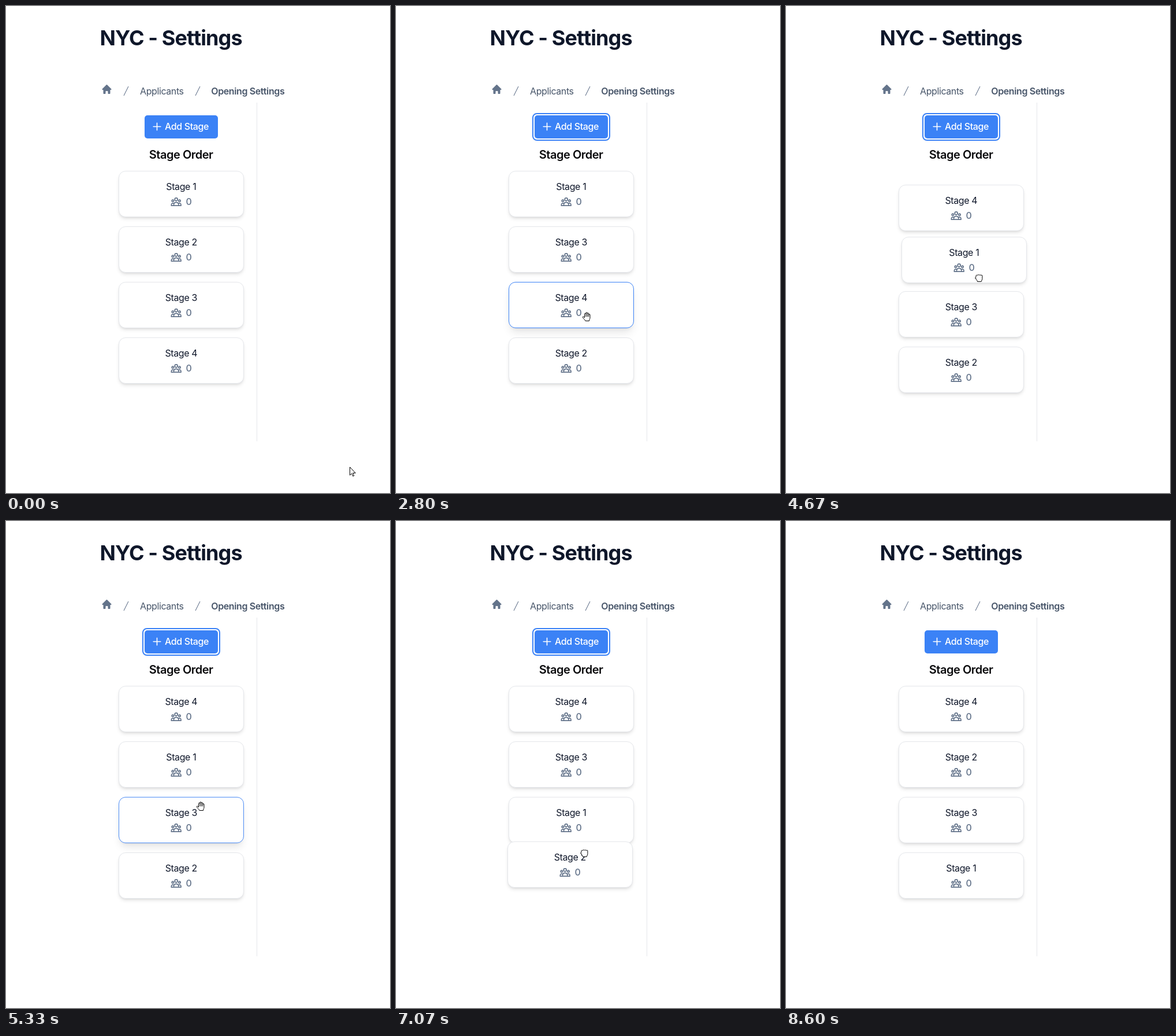
These frames come from a looping animation (665 by 842 pixels, 8.67 s). An HTML page:

```html
<!DOCTYPE html>
<html lang="en">
<head>
<meta charset="utf-8">
<title>Stage order</title>
<style>
  html, body { margin: 0; width: 100%; height: 100%; overflow: hidden; background: #fff; }
  svg { position: absolute; left: 0; top: 0; overflow: visible; }
  text { font-family: Inter, "Liberation Sans", sans-serif; font-size: 16px; letter-spacing: -0.025em; }
  .mid { text-anchor: middle; }
  .card {
    position: absolute; left: 0; top: 0; width: 217px; height: 80px; box-sizing: border-box;
    background: #fff; border: 1px solid; border-radius: 12px;
  }
  .card svg { left: -1px; top: -1px; }
  #pointer { z-index: 9; }
</style>
</head>
<body>
<svg width="665" height="842">
  <text x="162.5" y="68" font-weight="700" fill="#0f172a" style="font-size:36px">NYC - Settings</text>
  <g fill="#64748b">
    <path transform="translate(164.5 134)" d="M9.293 2.293a1 1 0 011.414 0l7 7A1 1 0 0117 11h-1v6a1 1 0 01-1 1h-2a1 1 0 01-1-1v-3a1 1 0 00-1-1H9a1 1 0 00-1 1v3a1 1 0 01-1 1H5a1 1 0 01-1-1v-6H3a1 1 0 01-.707-1.707l7-7z"/>
    <path id="slash" transform="translate(198 137)" d="M5.555 17.776l8-16 .894.448-8 16-.894-.448z"/>
    <use href="#slash" x="124"/>
  </g>
  <text x="232" y="152.5" fill="#475569">Applicants</text>
  <text x="355.3" y="152.5" font-weight="600" fill="#475569">Opening Settings</text>
  <path d="M434.5 167V752.5" stroke="#e5e7eb"/>
  <rect id="ring" x="237" y="186" width="133" height="46" rx="7" fill="none" stroke="#3b82f6" stroke-width="2"/>
  <rect x="240" y="189" width="127" height="40" rx="5" fill="#3b82f6"/>
  <path d="M255.2 208.5h12.6M261.5 202.2v12.6" stroke="#fff" stroke-width="1.6" stroke-linecap="round"/>
  <text class="mid" x="313" y="214" font-weight="500" fill="#fff">Add Stage</text>
  <text class="mid" x="303.2" y="264" font-weight="600" fill="#09090b" style="font-size:20px">Stage Order</text>
</svg>
<div id="list"></div>
<svg id="pointer" width="665" height="842">
  <g id="cursor" fill="#fff" stroke="#000" stroke-linejoin="round" stroke-linecap="round">
    <path id="arrow" d="M.5.5V14.2L3.7 11.3 5.8 16 7.8 15.1 5.7 10.5H9.8Z"/>
    <path id="point" d="M-1.5 11V1.3a1.4 1.4 0 0 1 2.8 0V7.2a1.4 1.4 0 0 1 2.7.2 1.3 1.3 0 0 1 2.5.6 1.2 1.2 0 0 1 2.3.6V13c0 2-1.2 3-1.5 5.5H.3C-.5 15.5-3 13-4.6 10.6c-.8-1.4.8-2.4 1.9-1.2zM1.3 7.2v3M4 7.4v2.6M6.5 8v2"/>
    <path id="grab" d="M-3.5 1.5V-4.5a1.2 1.2 0 0 1 2.4 0V-6a1.2 1.2 0 0 1 2.4 0v1a1.2 1.2 0 0 1 2.4 0v2a1.1 1.1 0 0 1 2.3 0V2c0 2-1.3 3-1.5 5.5h-6.5C-3 5-5 4-6.6 1.6c-.8-1.4.9-2.2 2-1.1zM-1.1-4.5V0M1.3-5V0M3.7-3V0"/>
    <path id="fist" d="M-5.2 1.5c-1.6-.3-1.6-2.4.2-2.6V-3.5a1.5 1.5 0 0 1 2.6-.8 1.6 1.6 0 0 1 2.9-.3 1.6 1.6 0 0 1 2.8.5 1.4 1.4 0 0 1 2.6 1V1.5c0 2.3-1.5 2.8-1.7 5H-2.5c-.2-2.5-2.2-3-2.7-5z"/>
  </g>
</svg>
<script>
const LOOP = 8670, TICK = 1000 / 15, DROP_TIME = 330, FADE = 150;
const LEFT = 195, TOP = 285, STEP = 96, PUSH = 112, W = 217, H = 80;
const $ = id => document.getElementById(id);
const clamp = v => Math.min(1, Math.max(0, v));
const lerp = (a, b, u) => a + (b - a) * u;

// Pointer way points: time, x, y
const path = [
  [10, 595, 797], [450, 328, 435], [1060, 328, 435], [1333, 320, 517], [1440, 322, 624],
  [2230, 322, 624], [2640, 330, 537], [3110, 330, 537], [3500, 327, 444], [3800, 327, 444],
  [4180, 329, 356], [4330, 329, 356], [4667, 334, 470], [4760, 334, 473], [5130, 334, 473],
  [5480, 339, 505], [5640, 339, 505], [6000, 335, 421], [6110, 335, 410], [6250, 335, 410],
  [6780, 328, 593], [6880, 328, 593], [7067, 326, 574], [7250, 336, 470], [7400, 333, 405],
  [7700, 333, 405], [8000, 173, 711], [8133, 97, 835], [8200, 60, 900]
];

// shifts: the times at which neighbours make room
const drags = [
  { id: 2, to: 3, grab: 1062, drop: 1440, shifts: [1285, 1390] },
  { id: 4, to: 1, grab: 3120, drop: 3530, shifts: [3380] },
  { id: 1, to: 1, grab: 4330, drop: 4860, shifts: [4591] },
  { id: 3, to: 1, grab: 5650, drop: 6200, shifts: [5945] },
  { id: 2, to: 1, grab: 6885, drop: 7420, shifts: [7130, 7290] }
];

function bezier(x1, y1, x2, y2) {
  const f = (a, b, s) => 3 * a * s * (1 - s) ** 2 + 3 * b * s * s * (1 - s) + s ** 3;
  return x => {
    let lo = 0, hi = 1;
    for (let i = 0; i < 24; i++) {
      const m = (lo + hi) / 2;
      if (f(x1, x2, m) < x) lo = m; else hi = m;
    }
    return f(y1, y2, lo);
  };
}
const moveEase = bezier(.2, 0, 0, 1), dropEase = bezier(.2, 1, .1, 1);
const moved = (t, start) => t < start ? 0 : t >= start + 200 ? 1 : moveEase((t - start) / 200);

// Monotone cubic through the way points
function slope(i, k) {
  if (i < 1 || i >= path.length - 1) return 0;
  const [a, b, c] = [path[i - 1], path[i], path[i + 1]];
  const p = (b[k] - a[k]) / (b[0] - a[0]), q = (c[k] - b[k]) / (c[0] - b[0]);
  return p * q > 0 ? 2 * p * q / (p + q) : 0;
}
function cursorAt(t) {
  const last = path.length - 1;
  if (t <= path[0][0]) return path[0].slice(1);
  if (t >= path[last][0]) return path[last].slice(1);
  const i = path.findIndex(p => p[0] > t) - 1, a = path[i], b = path[i + 1];
  const d = b[0] - a[0], u = (t - a[0]) / d, v = 1 - u;
  return [1, 2].map(k =>
    a[k] * (1 + 2 * u) * v * v + b[k] * u * u * (3 - 2 * u) +
    d * u * v * (v * slope(i, k) - u * slope(i + 1, k)));
}

// Card places by id, and the drag under way
function layout(t) {
  let order = [1, 2, 3, 4], drag = null;
  const place = {};
  for (const d of drags) {
    if (t < d.grab) break;
    if (t < d.drop + DROP_TIME) { drag = d; break; }
    order = order.filter(id => id !== d.id);
    order.splice(d.to, 0, d.id);
  }
  if (!drag) {
    order.forEach((id, i) => place[id] = [LEFT, TOP + STEP * i]);
    return { place, drag };
  }
  const home = order.indexOf(drag.id), down = drag.to > home;
  order.filter(id => id !== drag.id).forEach((id, j) => {
    const k = down ? j - home : home - 1 - j;
    const m = k >= 0 && k < drag.shifts.length ? moved(t, drag.shifts[k]) : 0;
    const push = j >= home ? 1 - m : m;
    place[id] = [LEFT, TOP + STEP * j + PUSH * push];
  });
  const from = cursorAt(drag.grab), now = cursorAt(Math.min(t, drag.drop));
  const x = LEFT + now[0] - from[0], y = TOP + STEP * home + now[1] - from[1];
  const u = t > drag.drop ? dropEase((t - drag.drop) / DROP_TIME) : 0;
  place[drag.id] = [lerp(x, LEFT, u), lerp(y, TOP + STEP * drag.to, u)];
  return { place, drag };
}

const inside = ([x, y], [l, t]) => x >= l && x < l + W && y >= t && y < t + H;
function hovered(t) {
  const { place, drag } = layout(t), c = cursorAt(t);
  return drag ? 0 : [1, 2, 3, 4].find(id => inside(c, place[id])) || 0;
}

function cursorKind(t, drag) {
  if (!drag) return hovered(t) ? "grab" : "arrow";
  if (t >= drag.drop) return "grab";
  const { place } = layout(t - 30), c = cursorAt(t);
  return [1, 2, 3, 4].some(id => id !== drag.id && inside(c, place[id])) ? "point" : "fist";
}

const people = "M17 20h5v-2a3 3 0 00-5.356-1.857M17 20H7m10 0v-2c0-.656-.126-1.283-.356-1.857M7 20H2v-2a3 3 0 015.356-1.857M7 20v-2c0-.656.126-1.283.356-1.857m0 0a5.002 5.002 0 019.288 0M15 7a3 3 0 11-6 0 3 3 0 016 0zm6 3a2 2 0 11-4 0 2 2 0 014 0zM7 10a2 2 0 11-4 0 2 2 0 014 0z";
const cards = [1, 2, 3, 4].map(id => {
  const el = document.createElement("div");
  el.className = "card";
  el.innerHTML = `<svg width="${W}" height="${H}">
    <text class="mid" x="108.3" y="33" fill="#0f172a">Stage ${id}</text>
    <path transform="translate(89.7 43.5) scale(.833)" d="${people}" fill="none" stroke="#64748b"
      stroke-width="2" stroke-linecap="round" stroke-linejoin="round"/>
    <text class="mid" x="121.5" y="59" font-weight="500" fill="#64748b">0</text></svg>`;
  $("list").append(el);
  return { id, el };
});

function shadow(h) {
  const part = (a, b) => a.map((v, i) => lerp(v, b[i], h) + "px").join(" ") + " rgba(0,0,0,.1)";
  return part([0, 4, 6, -1], [0, 10, 15, -3]) + "," + part([0, 2, 4, -2], [0, 4, 6, -4]);
}
const borderColor = h =>
  `rgb(${[[229, 59], [231, 130], [235, 246]].map(([a, b]) => Math.round(lerp(a, b, h)))})`;

function draw(t) {
  const { place, drag } = layout(t);
  const past = Array.from({ length: 10 }, (_, i) => hovered(t - i * FADE / 10));
  for (const { id, el } of cards) {
    const [x, y] = place[id].map(Math.round);
    const h = past.filter(p => p === id).length / past.length;
    el.style.transform = `translate(${x}px,${y}px)`;
    el.style.zIndex = drag && drag.id === id ? 2 : 1;
    el.style.borderColor = borderColor(h);
    el.style.boxShadow = shadow(h);
  }
  $("ring").setAttribute("opacity", clamp((t - 1020) / FADE) * clamp((8590 - t) / FADE));
  const [cx, cy] = cursorAt(t).map(Math.round), kind = cursorKind(t, drag);
  $("cursor").setAttribute("transform", `translate(${cx} ${cy})`);
  for (const name of ["arrow", "point", "grab", "fist"])
    $(name).style.display = name === kind ? "" : "none";
}

const start = performance.now();
function frame(now) {
  const t = Math.max(0, now - start) % LOOP;
  draw(Math.floor((t + 4) / TICK) * TICK);
  requestAnimationFrame(frame);
}
draw(0);
requestAnimationFrame(frame);
</script>
</body>
</html>
```
